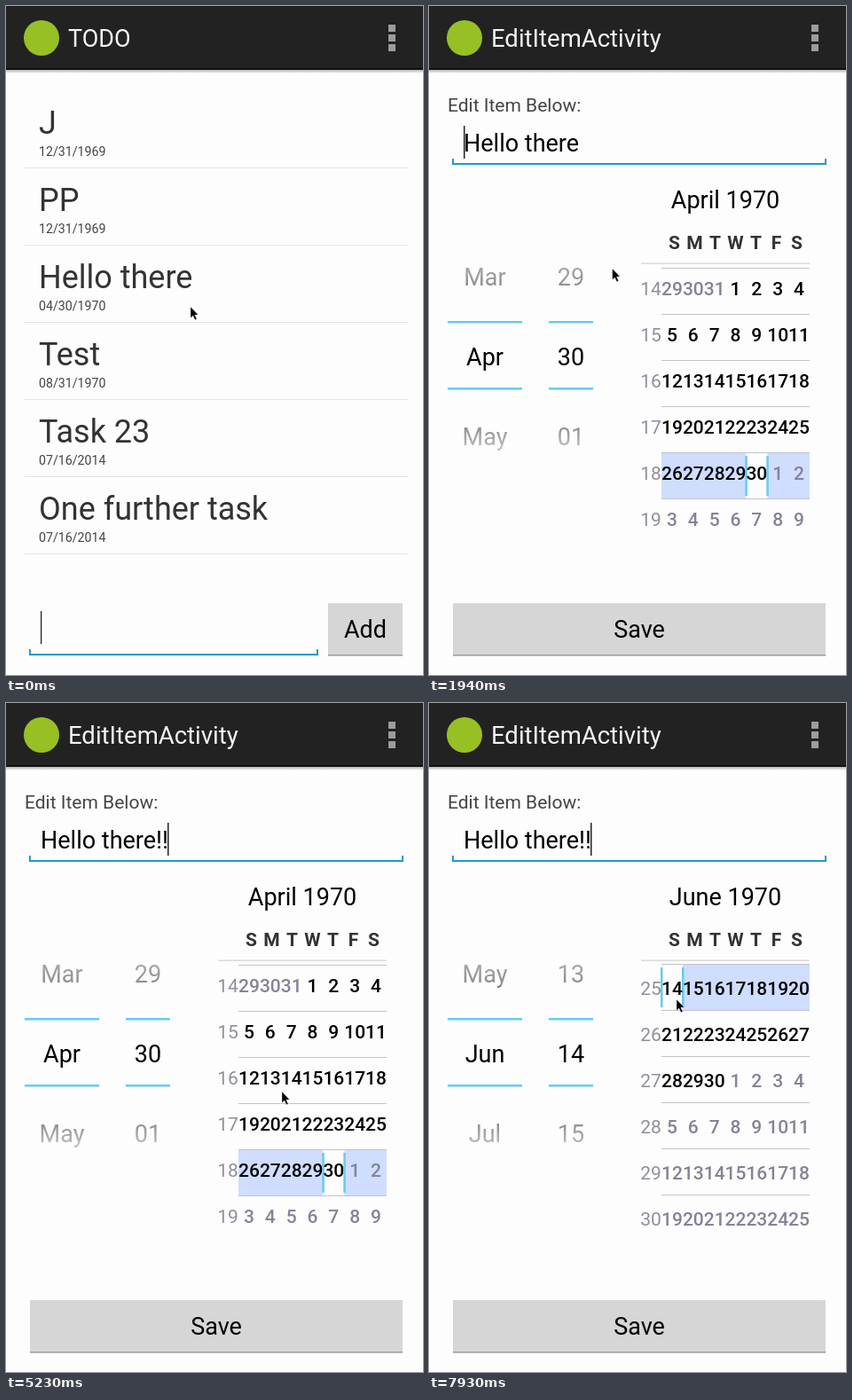
An HTML page with a canvas that plays this animation: 470x754 px, repeating every 8 s.

```html
<!DOCTYPE html>
<html lang="en">
<head>
<meta charset="utf-8">
<title>Todo list</title>
<style>
html, body { margin: 0; width: 100%; height: 100%; overflow: hidden; background: #fdfdfd; }
canvas { display: block; }
</style>
</head>
<body>
<canvas id="stage" width="470" height="754"></canvas>
<script>
const LOOP = 8000, BG = '#fdfdfd', CYAN = '#66ccee';
const MONTHS = ['January', 'February', 'March', 'April', 'May', 'June', 'July', 'August',
  'September', 'October', 'November', 'December'];
const TASKS = [['J', '12/31/1969'], ['PP', '12/31/1969'], ['Hello there', '04/30/1970'],
  ['Test', '08/31/1970'], ['Task 23', '07/16/2014'], ['One further task', '07/16/2014']];

// Times at which the text caret turns off, on, off ...
const BLINKS = [290, 740, 2090, 2540, 3280, 3730, 4330, 4780, 5980, 6580, 7180, 7780];
// [time, x, y] of the mouse pointer
const POINTER = [[1790, 208, 339], [2240, 204, 210], [2540, 202, 167], [4180, 202, 167],
  [4480, 222, 326], [4780, 250, 360], [5080, 305, 432], [5230, 311, 438], [5380, 250, 290],
  [5530, 170, 117], [5680, 240, 300], [5830, 294, 440], [5980, 300, 461], [6730, 303, 465],
  [7030, 303, 465], [7480, 279, 334]];
// [time, scroll distance] of the calendar
const SCROLL = [[5230, 0], [5380, 150], [5530, 320], [5680, 430], [5830, 495], [5980, 523],
  [6280, 523], [6730, 553], [7030, 569]];
// [time, scale, opacity, dimming] of the opening screen
const OPENING = [[1340, .82, .08, .02], [1640, .896, .5, .1], [1790, .975, .9, .1], [1940, 1, 1, 0]];

const stage = document.getElementById('stage').getContext('2d');
const sheet = document.createElement('canvas');
sheet.width = 480;
sheet.height = 762;
const layer = sheet.getContext('2d');
let g = stage;

function track(keys, t) {
  const i = keys.findIndex(k => k[0] > t);
  if (i === 0) return keys[0].slice(1);
  if (i < 0) return keys[keys.length - 1].slice(1);
  const a = keys[i - 1], b = keys[i], p = (t - a[0]) / (b[0] - a[0]);
  return a.slice(1).map((v, n) => v + (b[n + 1] - v) * p);
}

function rect(x, y, w, h, color) {
  g.fillStyle = color;
  g.fillRect(x, y, w, h);
}

function text(s, x, y, size, color = '#000', align = 'left', weight = 400) {
  g.font = `${weight} ${size}px Roboto, sans-serif`;
  g.textAlign = align;
  g.fillStyle = color;
  g.fillText(s, x, y);
}

function shape(points, color) {
  g.beginPath();
  points.forEach(([x, y]) => g.lineTo(x, y));
  g.closePath();
  g.fillStyle = color;
  g.fill();
}

function actionBar(title, size) {
  rect(-3, 0, 480, 762, BG);
  const shade = g.createLinearGradient(0, 72, 0, 76);
  shade.addColorStop(0, '#b4b4b4');
  shade.addColorStop(1, BG);
  rect(-3, 72, 480, 4, shade);
  rect(-3, 0, 480, 72, '#222');
  rect(-3, 70, 480, 2, '#131313');
  g.beginPath();
  g.arc(40, 36, 20, 0, 7);
  g.fillStyle = '#97c024';
  g.fill();
  text(title, 70, 46, size, '#f3f3f3');
  for (const y of [21, 32, 43]) rect(431, y, 8, 8, '#9c9c9c');
}

function button(label, x, w) {
  rect(x, 673, w, 58, '#d6d6d6');
  rect(x, 731, w, 1.5, '#9a9a9a');
  text(label, x + w / 2, 712, 27, '#000', 'center');
}

function underline(x, y, w, focused) {
  const color = focused ? '#1f9bc6' : '#999', h = focused ? 2 : 1;
  rect(x, y, w, h, color);
  rect(x - 1, y - 5, h, 5 + h, color);
  rect(x + w - h + 1, y - 5, h, 5 + h, color);
}

function drawList(t, caretOn) {
  actionBar('TODO', 27);
  if (t >= 890 && t < 1340) rect(21, 270, 432, 86, 'rgba(51,181,229,.4)');
  TASKS.forEach(([name, date], i) => {
    const y = 87 * i;
    text(name, 37, 144 + y, 36, '#333');
    text(date, 37, 169 + y, 14.2, '#444');
    rect(21, 182 + y, 432, 1, '#e4e4e4');
  });
  underline(27, 730, 324, t < 1040);
  if (caretOn) rect(39, 682, 1.3, 37, '#222');
  button('Add', 363, 84);
}

function drawCalendar(t, picked) {
  const [scroll] = track(SCROLL, t);
  const day = (week, col) => new Date(Date.UTC(1970, 2, 29 + 7 * (week - 14) + col));
  const first = 14 + Math.floor((scroll + 8) / 52);
  const month = day(first, 6).getUTCMonth();
  const gap = scroll ? 25 : 28.5;

  text(MONTHS[month] + ' 1970', 334, 228, 27, '#000', 'center');
  [...'SMTWTFS'].forEach((d, i) => text(d, 276.5 + 23 * i, 274, 21, '#333', 'center', 700));
  rect(239, 289.5, 190, 1.5, '#dadada');

  g.save();
  g.beginPath();
  g.rect(235, 291, 200, 313);
  g.clip();
  for (let week = first - 1; week < first + 8; week++) {
    const y = 318 + 52 * (week - 14) - scroll, bottom = Math.round(y + gap);
    const days = [0, 1, 2, 3, 4, 5, 6].map(col => day(week, col));
    const chosen = days.findIndex(d => +d === +picked);
    if (chosen >= 0) {
      const x = 262 + 23.83 * chosen;
      rect(262, bottom - 51, 167, 51, '#cfddff');
      rect(x, bottom - 51, 24, 51, BG);
      rect(x - 1, bottom - 48, 2.5, 45, CYAN);
      rect(x + 23, bottom - 48, 2.5, 45, CYAN);
    }
    rect(262, bottom, 167, 1, '#c4c2ca');
    text(week, 250, y + 7.5, 21, '#918e9c', 'center');
    days.forEach((d, i) => text(d.getUTCDate(), 274 + 23.83 * i, y + 7.5, 21,
      d.getUTCMonth() === month ? '#000' : '#858296', 'center', 500));
  }
  g.restore();
}

function drawWheels(picked) {
  const fade = g.createLinearGradient(0, 280, 0, 510);
  [[0, '#bbb'], [.16, '#8c8c8c'], [.35, '#000'], [.65, '#000'], [.84, '#8c8c8c'], [.97, '#c8c8c8']]
    .forEach(([p, c]) => fade.addColorStop(p, c));
  for (const step of [-1, 0, 1]) {
    const y = 404.5 + 90 * step, date = new Date(+picked + step * 864e5);
    text(MONTHS[picked.getUTCMonth() + step].slice(0, 3), 63, y, 27, fade, 'center');
    text(String(date.getUTCDate()).padStart(2, '0'), 160, y, 27, fade, 'center');
  }
  for (const y of [355, 430]) {
    rect(21, y, 84, 2.5, CYAN);
    rect(135, y, 50, 2.5, CYAN);
  }
}

function drawHandle() {
  g.save();
  g.shadowColor = 'rgba(0,0,0,.5)';
  g.shadowBlur = 4;
  g.shadowOffsetY = 2;
  rect(149.5, 195, 38, 36, '#1b93cf');
  g.restore();
  shape([[168.5, 178], [187.5, 195.5], [149.5, 195.5]], '#5ac6ec');
}

function drawEditor(t, caretOn) {
  const picked = new Date(t < 7780 ? Date.UTC(1970, 3, 30) : Date.UTC(1970, 5, 14));
  const marks = t < 3880 ? 0 : t < 4030 ? 1 : 2;
  actionBar('EditItemActivity', 27.5);
  text('Edit Item Below:', 21, 119, 21, '#444');
  text('Hello there' + '!'.repeat(marks), 39, 164, 27);
  underline(27, 177, 420, true);
  if (caretOn) rect(t < 2690 ? 39 : 168 + 7 * marks, 135, 1.5, 37, '#222');
  drawCalendar(t, picked);
  drawWheels(picked);
  button('Save', 27, 420);
  if (t >= 2840 && t < 3880) drawHandle();
}

function drawPointer(x, y) {
  const arrow = [[0, 0], [0, 12.5], [2.8, 10], [5, 14.8], [7, 13.8], [4.8, 9.2], [8.6, 9]];
  g.save();
  g.translate(x, y);
  shape(arrow, '#000');
  g.strokeStyle = 'rgba(255,255,255,.55)';
  g.lineWidth = .6;
  g.stroke();
  g.restore();
}

function draw(time) {
  const start = time < 3280 ? 140 : 130;
  const t = Math.floor((time - start) / 150) * 150 + start;
  const caretOn = BLINKS.filter(b => b <= t).length % 2 === 0;

  g = stage;
  if (t < 1940) drawList(t, caretOn);
  if (t >= 1940) {
    drawEditor(t, caretOn);
  } else if (t >= 1340) {
    const [scale, opacity, dim] = track(OPENING, t < 1640 ? 1340 : t);
    rect(0, 0, 470, 754, `rgba(0,0,0,${dim})`);
    g = layer;
    g.setTransform(1, 0, 0, 1, 3, 0);
    drawEditor(t, caretOn);
    g = stage;
    g.save();
    g.globalAlpha = opacity;
    g.translate(234 * (1 - scale), 364 * (1 - scale));
    g.scale(scale, scale);
    g.drawImage(sheet, -3, 0);
    g.restore();
  }
  drawPointer(...track(POINTER, t));
}

function tick() {
  draw(performance.now() % LOOP);
  requestAnimationFrame(tick);
}
tick();
</script>
</body>
</html>
```
